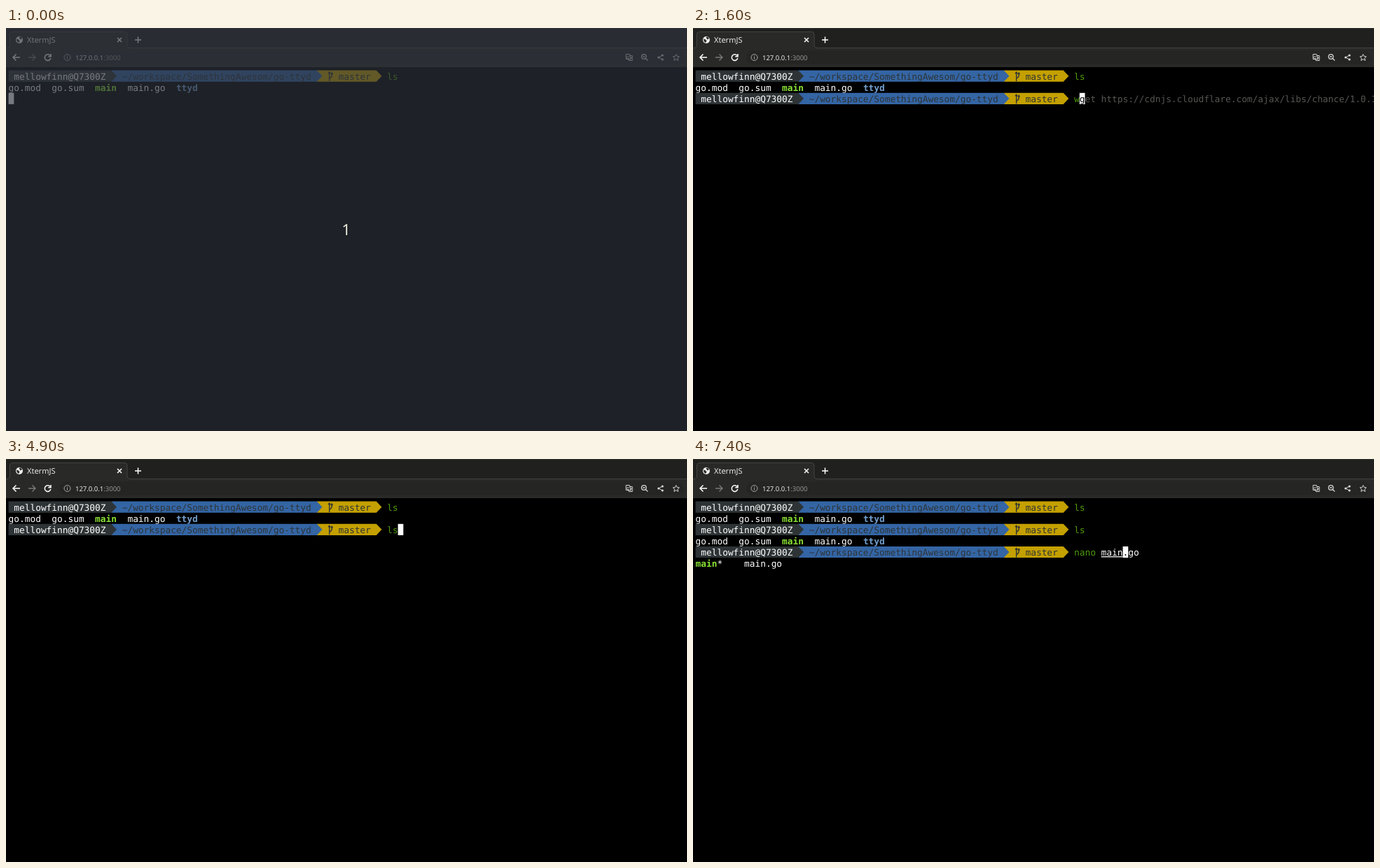
An HTML page that plays this animation: 972x576 px, repeating every 8 s.

```html
<!DOCTYPE html>
<html lang="en">
<head>
<meta charset="utf-8">
<title>XtermJS</title>
<style>
  html, body { margin: 0; width: 100%; height: 100%; overflow: hidden; background: #000; }
  svg { display: block; width: 972px; height: 576px; }
  text { white-space: pre; text-rendering: geometricPrecision; }
  #term { font: 12.82px "DejaVu Sans Mono", monospace; }
  .ui { font-family: "Noto Sans", "Open Sans", sans-serif; }
  .icon { fill: none; stroke: #d8d8d4; stroke-width: 1.3; }
</style>
</head>
<body>
<svg viewBox="0 0 972 576">
  <rect width="972" height="576"/>
  <rect width="972" height="28" fill="#20211f"/>
  <path d="M0 .5H972" stroke="#30312f"/>
  <rect y="28" width="972" height="28" fill="#292a28"/>
  <rect x="76" y="32" width="892" height="20" rx="10" fill="#252624"/>
  <path d="M0 28.5H2Q5.5 28.5 5.5 25V9Q5.5 5.5 9 5.5H169.5Q173 5.5 173 9V25Q173 28.5 177 28.5H972" fill="#292a28" stroke="#434441"/>
  <path d="M3 29H175" stroke="#292a28"/>
  <circle cx="19" cy="17" r="5" fill="#eee"/>
  <path d="M15 15.5l3 1 1.5 2-1.5 2.5q-3-1.5-3-5.500M18.500 13l2.500-.5 2 2.500-2.500 1.500z" fill="#292a28"/>
  <g class="ui" fill="#e8e8e4">
    <text x="30" y="20.500" font-size="11">XtermJS</text>
    <text x="99" y="45.500" font-size="9.500">127.0.0.1<tspan fill="#92938f">:3000</tspan></text>
  </g>
  <g class="icon">
    <path d="M159 14l6 6m0-6l-6 6M184 17h9m-4.500-4.500v9" stroke="#fff" stroke-width="1.500"/>
    <path d="M20 42H10m4.500-4.500L10 42l4.500 4.500" stroke="#fff" stroke-width="1.500"/>
    <path d="M32 42H42m-4.500-4.500L42 42l-4.500 4.500" stroke="#7b7c78"/>
    <path d="M63 39.500A4.300 4.300 0 1 0 63.800 43M64 37v3.700h-3.700" stroke="#fff" stroke-width="1.500"/>
    <g stroke="#a8a9a5" stroke-width="1"><circle cx="87.500" cy="42" r="4.500"/><path d="M87.500 41.300v3.200m0-5.200v1.200"/></g>
    <path d="M885 37.500h5l2 7h-7zM891 39.500h3v7h-5l-1-2" stroke-width="1"/>
    <path d="M889.500 40.500h-2a1.500 1.500 0 1 0 1.500 1.500m2.500 0h2m-1 0q0 2-2 3" stroke-width=".8"/>
    <circle cx="910.500" cy="41" r="3.300"/><path d="M913 43.500l3 3m-7-5.500h3"/>
    <path d="M937 39l-5.500 3 5.500 3" stroke-width="1"/>
    <g fill="#d8d8d4" stroke="none"><circle cx="937" cy="39" r="1.600"/><circle cx="931.500" cy="42" r="1.600"/><circle cx="937" cy="45" r="1.600"/></g>
    <path d="M956.500 37.500l1.400 3 3.200.4-2.400 2.200.7 3.300-2.900-1.700-2.900 1.700.7-3.300-2.400-2.200 3.200-.4z" stroke-width="1"/>
  </g>
  <g id="term"></g>
  <g id="count">
    <rect width="972" height="576" fill="rgb(46,51,61)" opacity=".65"/>
    <text class="ui" x="485.500" y="295.500" font-size="22" text-anchor="middle" fill="#e6e6d8">1</text>
  </g>
</svg>
<script>
const LOOP = 8000, CELL = 7.72, LINE = 16.1;
const WHITE = '#fff', DARK = '#2e3436', BLUE = '#3465a4', YELLOW = '#c4a000',
      GREEN = '#4e9a06', LIME = '#8ae234', SKY = '#729fcf', RED = '#ef2929', DIM = '#555753';
const BOLD = 'font-weight="bold"', UNDER = 'text-decoration="underline"';
const term = document.getElementById('term'), count = document.getElementById('count');

const px = col => 3.6 + col * CELL;
const py = row => 60.6 + row * LINE;
const say = (col, row, s, fill = WHITE, more = '') =>
  `<text x="${px(col)}" y="${py(row) + 13.1}" fill="${fill}" ${more}>${s}</text>`;
const box = (col, row, n, fill) =>
  `<rect x="${px(col)}" y="${py(row)}" width="${n * CELL}" height="${LINE}" fill="${fill}"/>`;
// Coloured strip ending in an arrow head
const flag = (from, to, row, fill) =>
  `<path d="M${px(from)} ${py(row)}H${px(to)}l${CELL} ${LINE / 2}l${-CELL} ${LINE / 2}H${px(from)}z" fill="${fill}"/>`;

function prompt(row) {
  const branch = `<path transform="translate(${px(59)} ${py(row)})" d="M2.500 2.500V15.500M2.500 11.500Q6 10 6 7V3.500M.8 4.500L2.500 2.500 4 4.500M4.700 5.500L6 3.500 7.300 5.500" fill="none" stroke="${DARK}" stroke-width="1.400"/>`;
  return flag(57, 68, row, YELLOW) + flag(19, 57, row, BLUE) + flag(0, 19, row, DARK) +
    say(1, row, 'mellowfinn@Q7300Z') +
    say(21, row, '~/workspace/SomethingAwesom/go-ttyd', DARK) +
    branch + say(61, row, 'master', DARK);
}

const listing = row => prompt(row) + say(70, row, 'ls', GREEN) +
  say(0, row + 1, 'go.mod') + say(8, row + 1, 'go.sum') +
  say(16, row + 1, 'main', LIME, BOLD) + say(22, row + 1, 'main.go') +
  say(31, row + 1, 'ttyd', SKY, BOLD);

const FETCH = 'get https://cdnjs.cloudflare.com/ajax/libs/chance/1.0.12/chance.min.js';
const SERVE = 'udo docker run -d -p 6379:6379 -v ~/data/:/data \\\n--name redis \\\nredis:alpine';

// time, row, typed text (null: no prompt yet), command colour, suggestion, its colour
const steps = [
  [0, 2, null],
  [200, 2, ''],
  [1600, 2, 'w', GREEN, FETCH],
  [1700, 2, 'wh', GREEN],
  [1800, 2, 'wh', RED],
  [1900, 2, 'who', GREEN],
  [2600, 2, 'wh', GREEN],
  [2700, 2, 'wh', RED],
  [2800, 2, 'w', GREEN, FETCH],
  [3100, 2, ''],
  [4000, 2, 's', WHITE],
  [4100, 2, 's', RED, SERVE],
  [4500, 2, ''],
  [4800, 2, 'l', GREEN, 's'],
  [4900, 2, 'ls', GREEN],
  [5000, 4, null],
  [5200, 4, ''],
  [5700, 4, 'n', RED, 'ano config.json'],
  [5800, 4, 'nan', RED, 'o config.json'],
  [5900, 4, 'nano', GREEN, ' config.json'],
  [6100, 4, 'nano ', GREEN, 'config.json'],
  [6900, 4, 'nano m', GREEN, 'ain.go'],
  [7000, 4, 'nano ma', GREEN, 'in.go'],
  [7100, 4, 'nano mai', GREEN, 'n.go'],
  [7200, 4, 'nano main', GREEN, '.go', WHITE],
  [7400, 4, 'nano main', GREEN, '.go', WHITE]
];

function screen([time, row, typed, fill, hint = '', hintFill = DIM]) {
  let out = listing(0);
  if (row === 4) out += listing(2);
  if (typed === null) return out + box(0, row, 1, WHITE);

  const [cmd, arg] = typed.split(' '), at = 70 + typed.length;
  out += prompt(row) + say(70, row, cmd, fill, fill === RED ? BOLD : '');
  if (arg) out += say(71 + cmd.length, row, arg, WHITE, UNDER);
  const [first, ...rest] = hint.split('\n');
  out += say(at + 1, row, first.slice(1), hintFill);
  rest.forEach((s, i) => out += say(0, row + 1 + i, s, hintFill));
  out += box(at, row, 1, WHITE) + say(at, row, first.slice(0, 1), '#000');
  if (time >= 7400) out += say(0, 5, 'main', LIME, BOLD) + say(4, 5, '*') + say(9, 5, 'main.go');
  return out;
}

let shown;
function draw() {
  const t = performance.now() % LOOP;
  const step = steps.findLast(s => s[0] <= t);
  if (step !== shown) term.innerHTML = screen(shown = step);
  count.style.display = t < 100 ? '' : 'none';
  requestAnimationFrame(draw);
}
draw();
</script>
</body>
</html>
```
